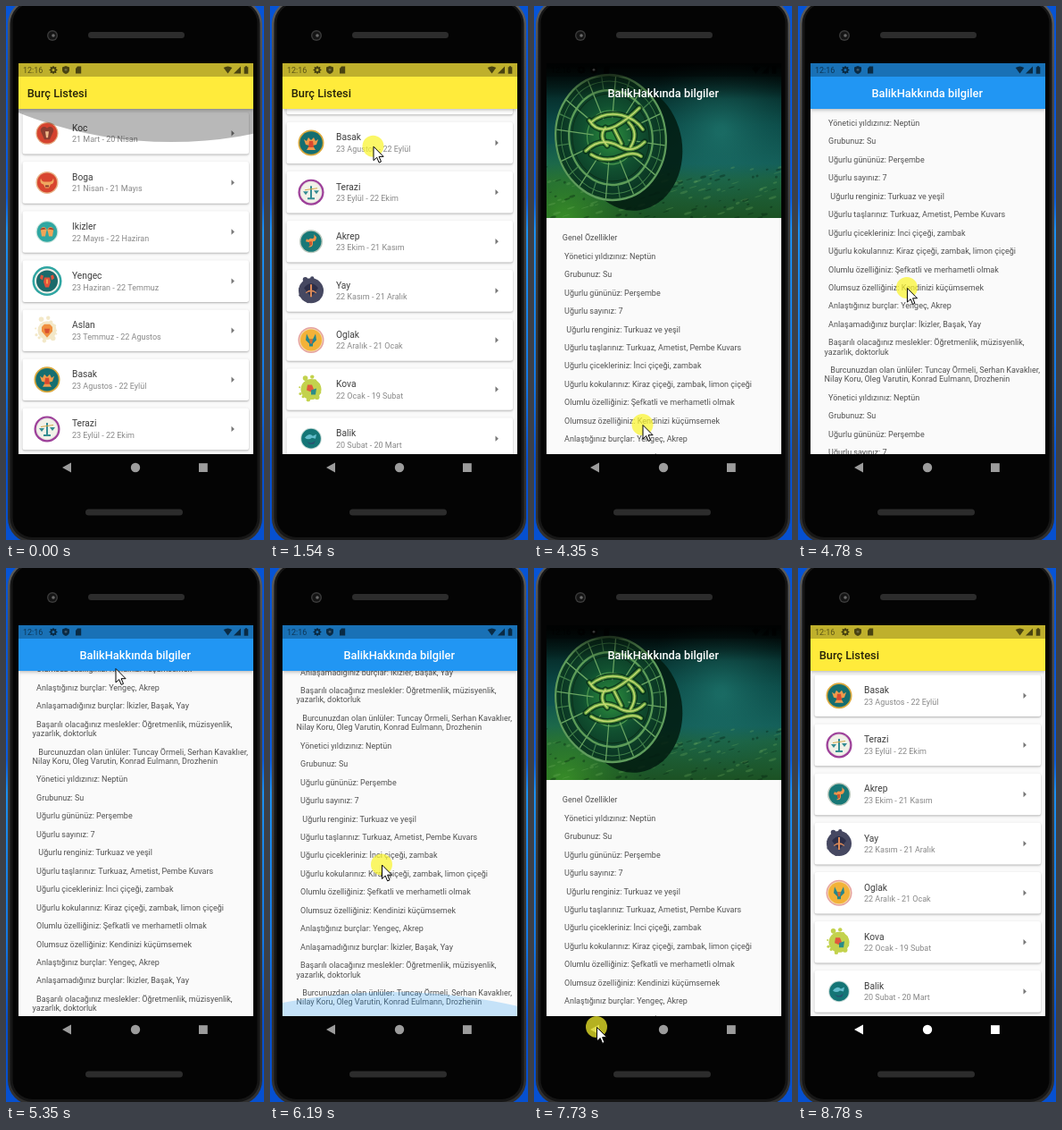
These frames come from a looping animation (289x597 px, 9.51 s). An HTML page with a canvas:

```html
<!DOCTYPE html>
<html lang="tr">
<head>
<meta charset="utf-8">
<title>Burç Listesi</title>
<style>
html, body { margin: 0; width: 100%; height: 100%; overflow: hidden; background: #0a4cc0; }
canvas { display: block; width: 289px; height: 597px; }
</style>
</head>
<body>
<canvas id="stage"></canvas>
<script>
const LOOP = 9510, W = 289, H = 597;
const X = 14, Y = 64, SW = 263, SH = 437, BAR = 51, TALL = 173;
const canvas = document.getElementById('stage'), c = canvas.getContext('2d');
const dpr = window.devicePixelRatio || 1;
canvas.width = W * dpr;
canvas.height = H * dpr;

// name, dates, discs (radius colour), figure colour + path, accent colour + path, splash
const signs = [
  ['Koc', '21 Mart - 20 Nisan', '12.5 #e3a57c 11.3 #d5432f', '#8c3c30', 'M-7-2a4 4 0 1 1 7 1a4 4 0 1 1 7-1L3 7H-3z', '#efb98a', 'M-2-2h4l-1 7h-2z'],
  ['Boga', '21 Nisan - 21 Mayıs', '12.5 #e8b58a 11 #d8452f', '#f0a860', 'M-7-5q1 4 4 4h6q3 0 4-4q2 6-3 7l-2 4h-4l-2-4q-5-1-3-7z', '#8c3c30', 'M-2 3h4v2h-4z'],
  ['Ikizler', '22 Mayıs - 22 Haziran', '12.5 #cfe6de 11.3 #2fa7a2', '#f0a558', 'M-7-1a3.4 3.4 0 1 1 6 1l-1 5h-4zM1 0a3.4 3.4 0 1 1 6-1l-1 6h-4z', '#a8472f', 'M-8-2a4 4 0 0 1 7-1zM1-3a4 4 0 0 1 7 1z'],
  ['Yengec', '23 Haziran - 22 Temmuz', '16.5 #2fa5a2 14 #f2f1ea 12 #1b6a6b', '#e2523b', 'M-3-4h6l1 5-2 6h-4l-2-6zM-7-7l3 1-1 5-3-2zM7-7l-3 1 1 5 3-2z', '#f0a050', 'M-1-2h2v5h-2z'],
  ['Aslan', '23 Temmuz - 22 Agustos', '10.5 #f3e8c8', '#f09040', 'M-6-4l3-3h6l3 3v5l-6 7-6-7z', '#d8512f', 'M-3-2h6l-1 5h-4z', '#f3e8c8'],
  ['Basak', '23 Agustos - 22 Eylül', '14.5 #dba83c 12.8 #156e70', '#ef9b4c', 'M-3-6l3 3 3-3 2 4 3-2-2 6-4 1 3 5h-10l3-5-4-1-2-6 3 2z', '#d9492f', 'M-2-2h4l1 7h-6z'],
  ['Terazi', '23 Eylül - 22 Ekim', '14.5 #9d3f99 12.3 #e0d6dc 11.5 #f1f1e8', '#348c92', 'M-1-7h2v13h3v2h-8v-2h3zM-9-1h6l-3 4zM3-2h6l-3 4z', '#d7a849', 'M-7-3L7-5v1L-7-2z'],
  ['Akrep', '23 Ekim - 21 Kasım', '13 #bcc9be 11.5 #187877', '#f1934a', 'M-3-2q3-3 5 0v5q-1 4-5 3l3-2zM0-3q5 0 3-5l3 3q0 5-4 5zM-5-3l3 2v2l-4-1z', '#c95730', 'M-2 0h3v4h-3z'],
  ['Yay', '22 Kasım - 21 Aralık', '14 #464861', '#2c2e48', 'M-8-3q8-10 16 0l-8 10z', '#dc8a58', 'M-1-7h2V7h-2zM-6 2q6-6 12 0v1q-6-4-12 0z', '#464861'],
  ['Oglak', '22 Aralık - 21 Ocak', '14.5 #e6a3a0 13 #f3d9a8 12 #f3b239', '#24868c', 'M-5-7l3 6h4l3-6 1 7-4 4v3h-4V4l-4-4z', '#d4662f', 'M-2-1h4l-1 5h-2z'],
  ['Kova', '22 Ocak - 19 Subat', '11.5 #c3d24d', '#e0593d', 'M-4-5h5l2 5-3 3-5-2z', '#2b8c88', 'M0 1l6-2-1 7h-5z', '#c3d24d'],
  ['Balik', '20 Subat - 20 Mart', '11.8 #bfd6d2 10.8 #147576', '#62bccb', 'M-7-1q5-6 9-2l4-2-1 5-4-1q-4 3-8 0z', '#2a4f70', 'M-5 3q5 4 10-1l-2 4h-5z'],
];

const block = [
  '  Yönetici yıldızınız: Neptün', '  Grubunuz: Su', '  Uğurlu gününüz: Perşembe',
  '  Uğurlu sayınız: 7', '   Uğurlu renginiz: Turkuaz ve yeşil',
  '  Uğurlu taşlarınız: Turkuaz, Ametist, Pembe Kuvars',
  '  Uğurlu çicekleriniz: İnci çiçeği, zambak',
  '  Uğurlu kokularınız: Kiraz çiçeği, zambak, limon çiçeği',
  '  Olumlu özelliğiniz: Şefkatli ve merhametli olmak',
  '  Olumsuz özelliğiniz: Kendinizi küçümsemek',
  '  Anlaştığınız burçlar: Yengeç, Akrep', '  Anlaşamadığınız burçlar: İkizler, Başak, Yay',
  '  Başarılı olacağınız meslekler: Öğretmenlik, müzisyenlik,\nyazarlık, doktorluk',
  '   Burcunuzdan olan ünlüler: Tuncay Örmeli, Serhan Kavaklıer,\nNilay Koru, Oleg Varutin, Konrad Eulmann, Drozhenin',
];
const lines = [' Genel Özellikler', ...block, ...block];

// Piecewise linear value at t; points are [time, value]
function key(t, pts) {
  if (t <= pts[0][0]) return pts[0][1];
  for (let i = 1; i < pts.length; i++) {
    const [a, u] = pts[i - 1], [b, v] = pts[i];
    if (t < b) return u + (v - u) * (t - a) / (b - a);
  }
  return pts[pts.length - 1][1];
}

const listScroll = [[500, 0], [1540, 264.5], [1582, 275]];
const pageScroll = [[4360, 0], [5360, 353.5], [5450, 388], [6300, 388], [6830, 104], [7020, 0]];
const pageShown = [[3200, 0], [3410, 1], [7860, 1], [8100, 0]];
const glowTop = [[80, 37], [360, 0]];
const glowEnd = [[1590, 0], [1890, 32], [2040, 32], [2390, 0]];
const glowPage = [[5420, 0], [5520, 25], [5850, 8], [6300, 33], [6830, 29], [7020, 0]];
const pointer = [
  [150, 118, 548], [360, 116, 432], [500, 116, 432], [1540, 115.5, 157], [1680, 115, 110],
  [1890, 115, 82], [2040, 115, 82], [2390, 114, 441], [2460, 114, 441], [2670, 110, 461],
  [3940, 110, 461], [4280, 121.5, 468], [4360, 121.5, 468], [5340, 122.5, 112], [5400, 122.5, 112],
  [5850, 125, 430], [6300, 125, 300], [6830, 128, 594], [6970, 129, 600], [7170, 126, 600],
  [7660, 70, 513], [8440, 70, 513], [8710, 75, 600],
];
const pointerX = pointer.map(p => [p[0], p[1]]), pointerY = pointer.map(p => [p[0], p[2]]);
const presses = [[500, 1990], [3000, 3070], [4290, 5330], [5870, 6800], [7700, 7790]];

function rect(x, y, w, h, fill) { c.fillStyle = fill; c.fillRect(x, y, w, h); }
function oval(x, y, rx, ry, tilt, fill) {
  c.fillStyle = fill;
  c.beginPath();
  c.ellipse(x, y, rx, ry, tilt, 0, 7);
  c.fill();
}
function disc(x, y, r, fill) { oval(x, y, r, r, 0, fill); }
function pill(x, y, w, h, r, fill, stroke) {
  c.beginPath();
  c.roundRect(x, y, w, h, r);
  c.fillStyle = fill;
  c.fill();
  if (stroke) { c.strokeStyle = stroke; c.stroke(); }
}
function shape(x, y, d, fill) {
  c.save();
  c.translate(x, y);
  c.fillStyle = fill;
  c.fill(new Path2D(d));
  c.restore();
}
function text(s, x, y, size, fill, weight = 400, align = 'left') {
  c.font = `${weight} ${size}px Roboto, sans-serif`;
  c.textAlign = align;
  c.fillStyle = fill;
  c.fillText(s, x, y);
}
function shadow(color, blur, dy) {
  c.shadowColor = color;
  c.shadowBlur = blur * dpr;
  c.shadowOffsetY = dy * dpr;
}
function clipBox(x, y, w, h) {
  c.beginPath();
  c.rect(x, y, w, h);
  c.clip();
}
function blend(gradient, ...stops) {
  stops.forEach(([p, col]) => gradient.addColorStop(p, col));
  return gradient;
}

function phone() {
  rect(0, 0, W, H, blend(c.createLinearGradient(0, 0, 0, H),
    [0, '#0654d6'], [.36, '#0a5ce0'], [.42, '#1c90f0'], [.7, '#1478e4'], [.85, '#0650d0'], [1, '#0650d0']));
  const rim = blend(c.createLinearGradient(0, 0, 0, H),
    [0, '#5a5a5a'], [.15, '#4a4a4a'], [.6, '#383838'], [1, '#303030']);
  pill(2, -7, 285, 607, 27, rim);
  pill(4.5, -5, 280, 602, 25, '#161616');
  pill(7.5, -3, 274, 597, 22, '#040404');
  pill(92, 29, 108, 7, 3.5, '#2c2c2c');
  pill(89, 562.5, 109, 7, 3.5, '#2c2c2c');
  disc(52, 33, 6, '#3a3a3a');
  disc(52, 33, 4.6, '#141414');
  disc(53, 33, 1.8, '#6a6a6a');
}

function navBar(fill) {
  shape(68, 516, 'M-5 0L5-5.6V5.6z', fill);
  disc(145, 516, 5.2, fill);
  rect(216, 511.2, 9.8, 9.8, fill);
}

function statusBar() {
  const ink = 'rgba(0,0,0,.62)';
  rect(X, Y, SW, 15, 'rgba(0,0,0,.25)');
  text('12:16', 19, 74.8, 9, 'rgba(0,0,0,.52)');
  c.lineWidth = 2;
  c.strokeStyle = ink;
  c.beginPath();
  c.arc(53, 71.5, 2.5, 0, 7);
  c.stroke();
  for (let i = 0; i < 8; i++) disc(53 + 3.8 * Math.cos(i * Math.PI / 4), 71.5 + 3.8 * Math.sin(i * Math.PI / 4), .8, ink);
  shape(67, 71.5, 'M0-4.5L4-3V0Q4 3 0 4.6Q-4 3-4 0V-3z', ink);
  disc(67, 71.3, 1.4, 'rgba(255,255,255,.22)');
  shape(81, 71.5, 'M-3-1.5L-1-4H3.2V4H-3z', ink);
  shape(248.5, 71.5, 'M-4.8-2.5Q0-5.5 4.8-2.5L0 4z', ink);
  shape(259, 71.5, 'M-4 4L4-4V4z', ink);
  shape(269, 71.5, 'M-2.3-3.2h1.2v-1h2.2v1h1.2V4.2h-4.6z', ink);
}

function glow(x, h, top, rgb, strength) {
  if (h <= 0) return;
  const R = 394, k = h / 44;
  const y = top ? Y + BAR + h - R * k : Y + SH - h + R * k;
  oval(x, y, R, R * k, 0, `rgba(${rgb},${strength * Math.min(1, h / 20)})`);
}

function icon(sign, x, y) {
  const [, , discs, fig, figPath, accent, accentPath, splash] = sign;
  if (splash) {
    for (let i = 0; i < 11; i++) {
      const a = i * 2.4, r = 10 + i * 7 % 5;
      disc(x + r * Math.cos(a), y + r * Math.sin(a), 1 + i * 5 % 4 * .6, splash);
    }
  }
  const parts = discs.split(' ');
  for (let i = 0; i < parts.length; i += 2) disc(x, y, +parts[i], parts[i + 1]);
  shape(x, y, figPath, fig);
  shape(x, y, accentPath, accent);
}

function listPage(t) {
  const scroll = key(t, listScroll);
  rect(X, Y, SW, SH, '#fafafa');
  signs.forEach((sign, i) => {
    const y = 142.3 + 55.1 * i - scroll;
    if (y < 85 || y > 530) return;
    c.save();
    shadow('rgba(0,0,0,.3)', 2.2, 1);
    pill(18.5, y - 23.3, 253.5, 46.6, 2.5, '#fff');
    c.restore();
    icon(sign, 46, y);
    text(sign[0], 74, y - 2.6, 10.24, 'rgba(0,0,0,.76)');
    text(sign[1], 74, y + 10, 9, 'rgba(0,0,0,.47)');
    shape(252.5, y, 'M0-3.2L3.4 0L0 3.2z', '#777');
  });
  glow(185, key(t, glowTop), true, '0,0,0', .28);
  glow(120, key(t, glowEnd), false, '0,0,0', .28);
  c.save();
  shadow('rgba(0,0,0,.3)', 4, 1);
  rect(X, Y, SW, BAR, '#ffeb3b');
  c.restore();
  statusBar();
  text('Burç Listesi', 23.7, 101.5, 12.8, 'rgba(0,0,0,.85)', 500);
}

// Dim green scene with a large wheel, in coordinates of the full header
function scene() {
  rect(0, 0, SW, TALL, blend(c.createLinearGradient(0, 0, 0, TALL),
    [0, '#010a0a'], [.12, '#04211f'], [.4, '#0b4a47'], [.65, '#14605a'], [.75, '#1d6440'], [1, '#1c5224']));
  rect(0, 0, SW, TALL, blend(c.createRadialGradient(195, 75, 5, 195, 75, 90),
    [0, 'rgba(34,125,115,.6)'], [1, 'rgba(20,90,85,0)']));
  rect(0, 90, 170, 83, blend(c.createRadialGradient(20, TALL, 5, 20, TALL, 95),
    [0, 'rgba(60,150,40,.8)'], [1, 'rgba(40,110,30,0)']));
  for (let i = 0; i < 150; i++) {
    const x = i * 61.8 % SW, y = 116 + i * i * 7.3 % 57;
    oval(x, y, 1.5 + i % 4, .6 + i % 3 * .4, -.3, i % 2 ? 'rgba(120,185,100,.25)' : 'rgba(0,30,15,.35)');
  }
  oval(94, 94, 58, 71, -.15, 'rgba(2,26,16,.85)');

  c.save();
  c.translate(72, 83);
  c.rotate(-.15);
  c.scale(.88, 1);
  disc(0, 0, 71, '#0b3a20');
  disc(0, 0, 66, blend(c.createRadialGradient(0, 0, 5, 0, 0, 66),
    [0, '#2a8a3c'], [.5, '#115030'], [1, '#0a3422']));
  const rings = [[70, 2.5, '#5f9c5c'], [63, 1, '#3f8048'], [53, 2.5, '#5c9c58'], [49, 1, '#0a2c18'], [30, 1.2, '#4f9c50']];
  for (const [r, w, col] of rings) {
    c.lineWidth = w;
    c.strokeStyle = col;
    c.beginPath();
    c.arc(0, 0, r, 0, 7);
    c.stroke();
  }
  c.lineWidth = 1.4;
  for (let i = 0; i < 24; i++) {
    c.rotate(Math.PI / 12);
    c.strokeStyle = i % 2 ? '#3f7c48' : '#6aa662';
    c.beginPath();
    c.moveTo(i % 2 ? 54 : 22, 0);
    c.lineTo(69, 0);
    c.stroke();
  }
  c.restore();

  c.lineCap = 'round';
  const fish = [
    'M48 64Q58 80 78 70Q92 62 104 50M50 66Q64 54 84 58Q100 62 108 74',
    'M44 98Q60 82 80 92Q96 102 110 88M50 102Q66 112 84 104Q98 98 106 104',
    'M66 72Q58 82 68 92M92 66Q104 78 94 94M76 74L84 90',
  ];
  for (const [w, col] of [[7, 'rgba(6,40,20,.7)'], [4, '#5f9c3c'], [1.6, '#c2d870']]) {
    c.lineWidth = w;
    c.strokeStyle = col;
    fish.forEach(d => c.stroke(new Path2D(d)));
  }
  rect(0, 0, SW, 40, blend(c.createLinearGradient(0, 0, 0, 40), [0, 'rgba(0,0,0,.85)'], [1, 'rgba(0,0,0,0)']));
}

function detailPage(t, fade) {
  const scroll = key(t, pageScroll), span = TALL - BAR;
  const fold = Math.min(1, scroll / span), head = TALL - span * fold;
  const ease = 1 - (1 - fade) ** 3;
  c.save();
  c.globalAlpha = fade;
  c.translate(0, (1 - ease) * SH / 4);
  rect(X, Y, SW, SH, '#fafafa');
  let y = 262.2 - scroll;
  for (const entry of lines) {
    const rows = entry.split('\n');
    rows.forEach((row, i) => {
      const at = y + 10.3 * i;
      if (at > 90 && at < 515) text(row, 29.6, at, 9, 'rgba(0,0,0,.68)');
    });
    y += 20.46 + 10.3 * (rows.length - 1);
  }
  glow(137, key(t, glowPage), false, '33,150,243', .24);

  c.save();
  if (fold > .5) shadow('rgba(0,0,0,.3)', 4, 1);
  rect(X, Y, SW, head, '#2196f3');
  c.restore();
  const shown = 1 - Math.max(0, (fold - .706) / .294);
  if (shown > 0) {
    c.save();
    clipBox(X, Y, SW, head);
    c.globalAlpha = fade * shown;
    c.translate(X, Y - span / 4 * fold);
    scene();
    c.restore();
  }
  statusBar();
  text('BalikHakkında bilgiler', 144.7, 101.5, 12.8, '#fff', 500, 'center');
  c.restore();
}

function cursor(t) {
  if (t < 150 || t > 8710) return;
  const x = key(t, pointerX), y = key(t, pointerY);
  if (presses.some(([a, b]) => t >= a && t < b)) disc(x, y, 12, 'rgba(250,244,45,.72)');
  const arrow = new Path2D('M.5.5V16L4.2 12.6L6.6 18.4L9 17.4L6.6 11.7H11.6z');
  c.save();
  c.translate(x, y);
  c.fillStyle = '#fff';
  c.strokeStyle = '#000';
  c.lineWidth = 1;
  c.fill(arrow);
  c.stroke(arrow);
  c.restore();
}

function draw(now) {
  const t = now % LOOP, fade = key(t, pageShown);
  c.setTransform(dpr, 0, 0, dpr, 0, 0);
  phone();
  c.save();
  clipBox(X, Y, SW, SH);
  if (fade < 1) listPage(t);
  if (fade > 0) detailPage(t, fade);
  c.restore();
  navBar(t < 8440 ? '#9c9c9c' : '#fff');
  cursor(t);
}

const start = performance.now();
function tick() {
  draw(performance.now() - start);
  requestAnimationFrame(tick);
}
tick();
</script>
</body>
</html>
```
